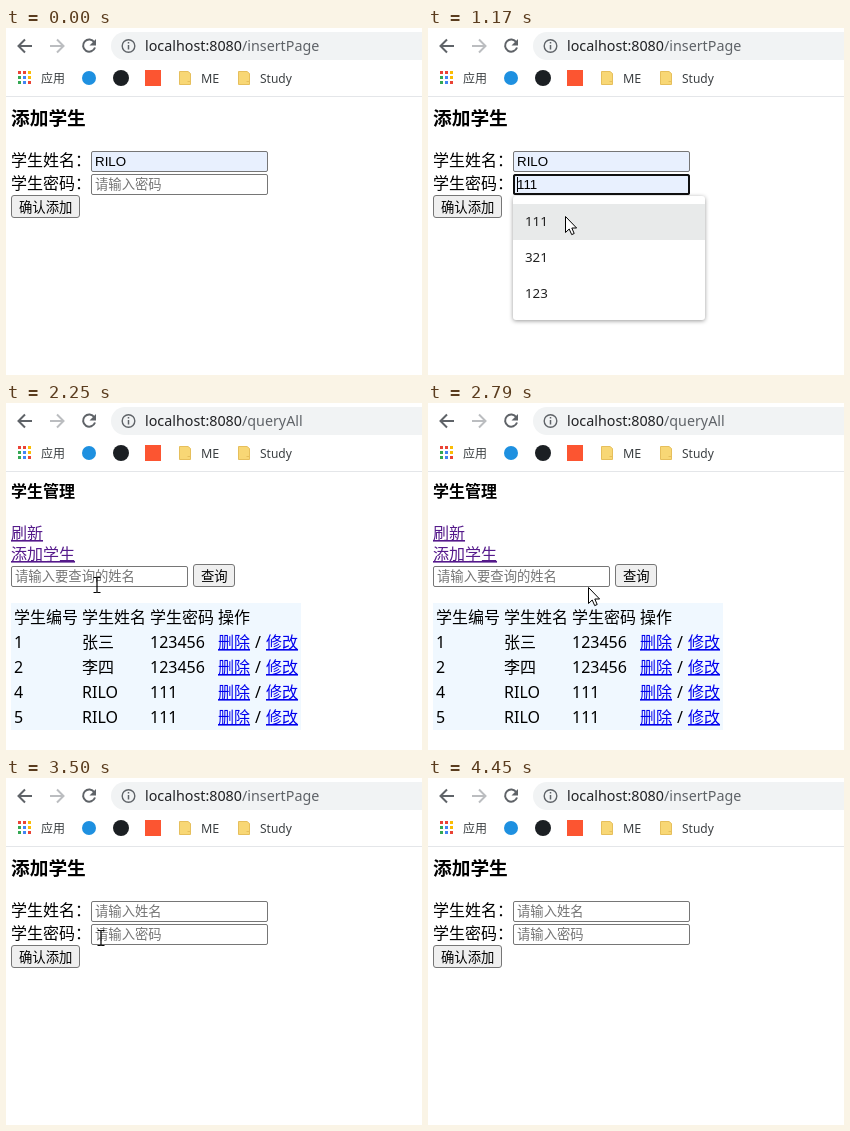
These frames come from a looping animation (416x347 px, 4720 ms). An HTML page:

```html
<!DOCTYPE html>
<html lang="zh-CN">
<head>
<meta charset="utf-8">
<style>
  html, body { margin: 0; height: 100%; overflow: hidden; background: #fff; }
  svg { display: block; width: 100vw; height: 100vh; font-family: "Noto Sans", "Noto Sans CJK SC", sans-serif; }
  .field { font-family: "Liberation Sans", "Noto Sans CJK SC", sans-serif; font-size: 13.33px; }
  .link { text-decoration: underline; }
</style>
</head>
<body>
<svg id="stage" viewBox="0 0 416 347"></svg>
<script>
const LOOP = 4720, TICK = 68.3;
const NAME = "RILO";
const VISITED = "#551a8b", LINK = "#0000ee", HINT = "#757575", AUTO = "#e8f0fe";

const text = (x, y, s, size = 16, fill = "#000", more = "") =>
  `<text x="${x}" y="${y}" font-size="${size}" fill="${fill}" ${more}>${s}</text>`;
const rect = (x, y, w, h, fill, more = "") =>
  `<rect x="${x}" y="${y}" width="${w}" height="${h}" fill="${fill}" ${more}/>`;
const path = (d, stroke, w = 2, fill = "none") =>
  `<path d="${d}" fill="${fill}" stroke="${stroke}" stroke-width="${w}"/>`;
const group = (id, s) => `<g id="${id}">${s}</g>`;
const fieldText = (x, y, s, fill = "#000") => text(x, y, s, 13.33, fill, 'class="field"');
const link = (x, y, s, fill) => text(x, y, s, 16, fill, 'class="link"');
const input = (x, y, fill = "#fff") =>
  rect(x + .5, y + .5, 176, 20, fill, 'stroke="#767676" rx="1.5"');
const button = (x, y, w, h, s, id) =>
  rect(x + .5, y + .5, w - 1, h - 1, "#efefef", `stroke="#767676" rx="2.5" id="${id}"`) +
  fieldText(x + 8, y + 17, s);

function folder(x) {
  return path(`M${x + .5} 43.5h8.5l2.5 2v11h-11z`, "#e6bf5c", 1, "#f8d775") +
    path(`M${x + 8.5} 53.5h3`, "#e6bf5c", 1);
}

function toolbar() {
  const dots = ["#ea4335", "#ea4335", "#fbbc04", "#34a853", "#4285f4", "#fbbc04", "#34a853", "#4285f4", "#ea4335"];
  return path("M26 18H13M19 11.5L12.5 18l6.5 6.5", "#5f6368") +
    path("M44 18H57M51 11.5L57.5 18l-6.5 6.5", "#bbbdc0") +
    path("M88.3 14.2A6.1 6.1 0 1 0 89 19.5", "#5f6368") +
    path("M90 11v6.5h-6.5z", "none", 0, "#5f6368") +
    rect(105, 4, 340, 28, "#f1f3f4", 'rx="14"') +
    '<circle cx="122.5" cy="18" r="6.3" fill="none" stroke="#5f6368" stroke-width="1.4"/>' +
    path("M122.5 17v4.5M122.5 14v1.6", "#5f6368", 1.5) +
    `<text x="139" y="23" font-size="14.3" fill="#202124">localhost:8080<tspan id="route" fill="#5f6368"></tspan></text>` +
    dots.map((c, i) => rect(12 + i % 3 * 5, 43 + (i / 3 | 0) * 5, 3, 3, c)).join("") +
    text(35, 54.5, "应用", 12, "#3c4043") +
    '<circle cx="83" cy="50" r="7" fill="#1e90e0"/><circle cx="115" cy="50" r="8" fill="#1b1f23"/>' +
    rect(139, 42, 16, 16, "#fc5531") +
    folder(173) + text(195, 54.5, "ME", 12.5, "#3c4043") +
    folder(232) + text(254, 54.5, "Study", 12, "#3c4043") +
    rect(0, 68, 416, 1, "#e4e6e9");
}

function insertPage() {
  return text(5, 97, "添加学生", 18.72, "#000", 'font-weight="700"') +
    text(5, 138, "学生姓名：") + text(5, 161, "学生密码：") +
    group("nameBox", "") + group("passBox", "") +
    button(5, 167, 69, 23, "确认添加", "submit") +
    group("menu",
      rect(85, 168, 192, 124, "#fff", 'rx="3" style="filter:drop-shadow(0 1px 2px #0006)"') +
      rect(85, 176, 192, 36, "#e8eaea", 'id="row"') +
      ["111", "321", "123"].map((s, i) => text(97, 198 + 36 * i, s, 13.33, "#222")).join(""));
}

function queryPage() {
  const rows = [[1, "张三", 123456], [2, "李四", 123456], [4, NAME, 111], [5, NAME, 111]];
  const line = (cells, y) => cells.map((s, i) => text(8 + 68 * i, y, s)).join("");
  return text(5, 94, "学生管理", 16, "#000", 'font-weight="700"') +
    link(5, 136, "刷新", VISITED) + link(5, 157, "添加学生", VISITED) +
    input(5, 163) + fieldText(9, 178, "请输入要查询的姓名", HINT) +
    button(187, 161, 42, 23, "查询", "search") +
    rect(5, 200, 290, 127, "#f0f8ff") +
    line(["学生编号", "学生姓名", "学生密码", "操作"], 220) +
    rows.map((r, i) => {
      const y = 245 + 25 * i;
      return line(r, y) + link(212, y, "删除", LINK) + text(249, y, "/") + link(260, y, "修改", LINK);
    }).join("");
}

const pointers = {
  arrow: path("M.5.5V16.5L4.2 13L6.7 18.6L9.2 17.5L6.8 12H11.6z", "#000", 1, "#fff"),
  beam: path("M-3.5-7.5H-1L0-7L1-7.5H3.5M0-7V7M-3.5 7.5H-1L0 7L1 7.5H3.5", "#000", 1.2),
  hand: path("M-2 1.5Q-2-.5-.2-.5T1.6 1.5V7.5Q4.2 6 4.5 8V8.5Q7 7 7.2 9.5Q9.5 9 9.5 11V16Q9.5 19 7.5 20.5V23H-1V20.5L-6 14Q-6.8 11.5-4.3 11.8L-2 14z",
    "#000", 1, "#fff")
};

stage.innerHTML = toolbar() + group("insert", insertPage()) + group("query", queryPage()) + group("pointer", "");
const $ = id => document.getElementById(id);
const show = (id, on) => $(id).style.display = on ? "" : "none";

// pointer stops: tick, x, y
const stops = [[2, 286, 308], [9, 112, 156], [13, 112, 157], [17, 137, 188], [18, 129, 192], [20, 129, 192],
  [27, 71, 178], [31, 71, 178], [33, 91, 182], [35, 171, 187], [39, 171, 187], [45, 29, 150], [48, 29, 150],
  [54, 161, 170], [55, 161, 170], [56, 163, 174], [62, 350, 338], [63, 350, 338], [64, 352, 340]];

function pointerAt(k) {
  const i = Math.max(1, stops.findIndex(s => s[0] >= k));
  const [a, b] = [stops[i - 1], stops[i]];
  const u = (k - a[0]) / (b[0] - a[0]), e = u * u * (3 - 2 * u);
  return [1, 2].map(j => Math.round(a[j] + (b[j] - a[j]) * e));
}

function draw(t) {
  const k = Math.floor((t + 8) / TICK);
  const onQuery = k >= 30 && k < 49, fresh = k >= 49;
  const menu = k >= 11 && k < 21, focus = k >= 10 && k < 30;
  const visible = k >= 2 && k < 65;
  const [x, y] = visible ? pointerAt(k) : [-50, -50];
  const over = (l, top, r, bottom) => x >= l && x < r && y >= top && y < bottom;
  const picked = k >= 21 && k < 30, preview = menu && over(85, 176, 277, 212);
  const filled = picked || preview;

  show("insert", !onQuery);
  show("query", onQuery);
  $("route").textContent = onQuery ? "/queryAll" : "/insertPage";

  $("nameBox").innerHTML = input(85, 123, fresh ? "#fff" : AUTO) +
    fieldText(89, 138, fresh ? "请输入姓名" : NAME, fresh ? HINT : "#000");
  $("passBox").innerHTML = input(85, 146, filled ? AUTO : "#fff") +
    fieldText(89, 161, filled ? "111" : "请输入密码", filled ? "#000" : HINT) +
    (focus ? rect(86, 147, 175, 19, "none", 'stroke="#101010" stroke-width="2" rx="1.5"') +
      rect(picked ? 109 : 89, 149, 1, 15, "#000") : "");
  show("menu", menu);
  show("row", preview);
  $("submit").setAttribute("fill", over(5, 167, 74, 190) ? "#e5e5e5" : "#efefef");

  const typing = onQuery ? over(5, 163, 182, 184) : over(85, 123, 262, 144) || over(85, 146, 262, 167);
  const kind = typing ? "beam" : onQuery && over(5, 144, 69, 161) ? "hand" : "arrow";
  $("pointer").innerHTML = visible ? pointers[kind] : "";
  $("pointer").setAttribute("transform", `translate(${x} ${y})`);
}

const start = performance.now();
(function frame() {
  draw((performance.now() - start) % LOOP);
  requestAnimationFrame(frame);
})();
</script>
</body>
</html>
```
